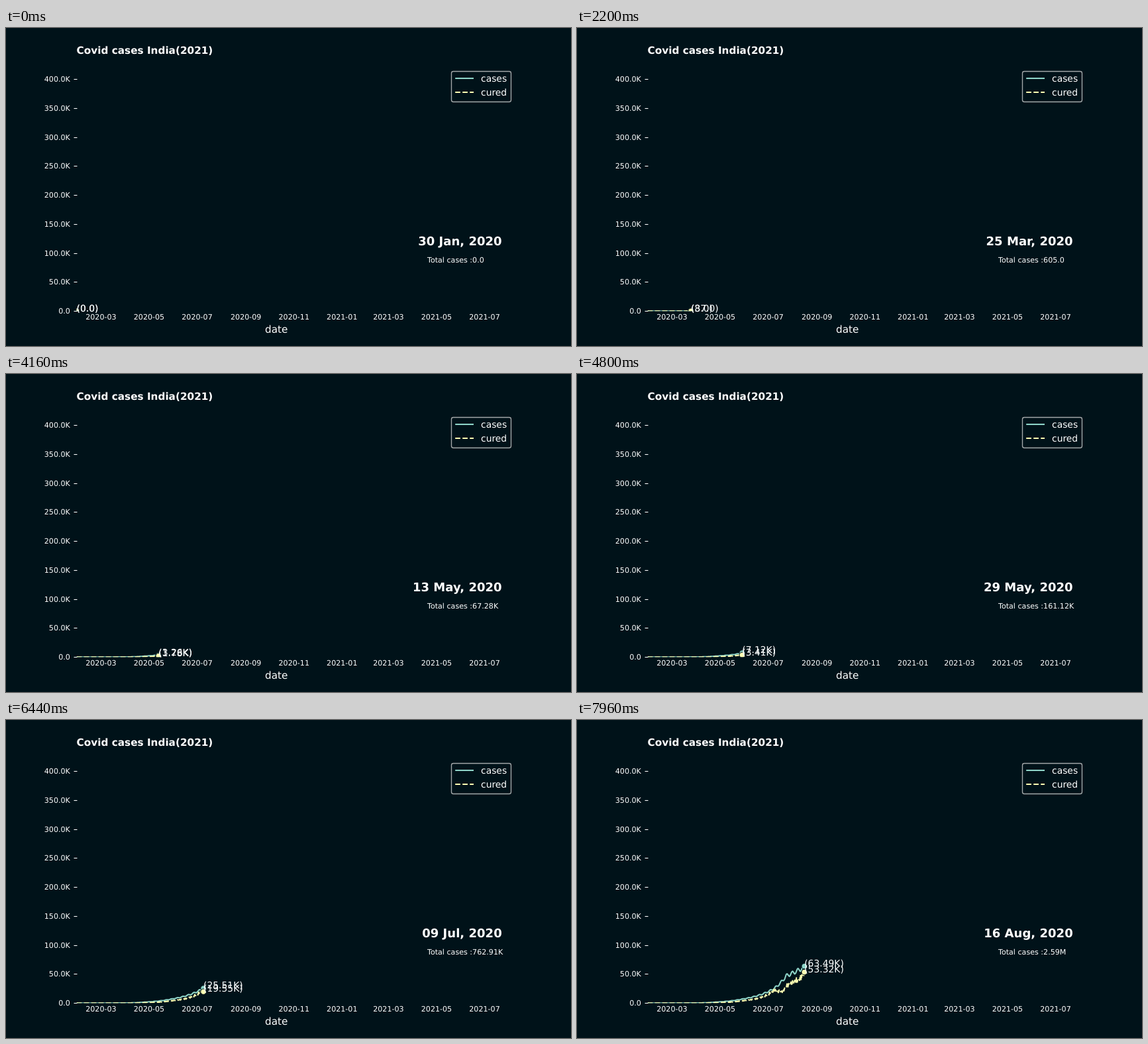
These frames come from a looping animation (853 by 480 pixels, 8 s). An HTML page:

```html
<!DOCTYPE html>
<html lang="en">
<head>
<meta charset="utf-8">
<title>Covid cases India(2021)</title>
<style>
  html, body { margin: 0; width: 100%; height: 100%; overflow: hidden; background: #001219; }
  svg { display: block; width: 853px; height: 480px; }
  text { font-family: "DejaVu Sans", sans-serif; fill: #fff; text-rendering: geometricPrecision; white-space: pre; }
  .small { font-size: 11.11px; }
  .medium { font-size: 13.89px; }
  .large { font-size: 15.28px; }
  .date { font-size: 18.06px; }
  .bold { font-weight: bold; }
  .end { text-anchor: end; }
  .middle { text-anchor: middle; }
  .line { fill: none; stroke-width: 2.08; stroke-linejoin: round; }
  .cases { stroke: #8dd3c7; }
  .cured { stroke: #feffb3; stroke-dasharray: 7.71 3.33; }
  .dot { stroke: #001219; stroke-width: 1; }
</style>
</head>
<body>
<svg viewBox="0 0 853 480">
  <defs><clipPath id="plot"><rect x="106.6" y="57.6" width="661.1" height="369.6"/></clipPath></defs>
  <rect width="853" height="480" fill="#001219"/>
  <text class="large bold" x="106.6" y="39">Covid cases India(2021)</text>
  <text class="large" x="391" y="460">date</text>
  <g id="axes"></g>

  <g clip-path="url(#plot)">
    <path id="casesLine" class="line cases"/>
    <path id="curedLine" class="line cured"/>
    <circle id="casesDot" class="dot" r="4.2" fill="#8dd3c7"/>
    <circle id="curedDot" class="dot" r="4.2" fill="#feffb3"/>
  </g>
  <text id="casesLabel" class="medium"></text>
  <text id="curedLabel" class="medium"></text>

  <rect x="672.5" y="65.5" width="90" height="46" rx="2.8" fill="#001219" stroke="#ccc" stroke-opacity=".8" stroke-width="1.39"/>
  <path class="line cases" d="M678.2 76h27.8"/>
  <path class="line cured" d="M678.2 97h27.8"/>
  <text class="medium" x="717" y="81">cases</text>
  <text class="medium" x="717" y="102">cured</text>

  <text id="date" class="date bold end" x="748.7" y="328"></text>
  <text id="total" class="small" x="636" y="354"></text>
</svg>
<script>
const DAYS = 200, DAY_MS = 40;
const $ = id => document.getElementById(id);
const xAt = day => 106.6 + day * 1.189;
const yAt = count => 427.2 - count * 0.000875;

// Exponential growth through [day, count] keys, times a periodic reporting ripple.
function growth(keys, ripple = () => 1) {
  const level = ([day, count]) => Math.log1p(count / ripple(day));
  return Array.from({ length: DAYS }, (_, day) => {
    const i = Math.max(1, keys.findIndex(key => key[0] >= day));
    const from = keys[i - 1], to = keys[i];
    const part = (day - from[0]) / (to[0] - from[0]);
    const trend = Math.expm1(level(from) + (level(to) - level(from)) * part);
    return Math.round(trend * ripple(day));
  });
}

const wave = (period, peak, size) => day => 1 + size * Math.cos(2 * Math.PI * (day - peak) / period);

const cases = growth([[0, 0], [31, 0], [38, 5], [55, 87], [87, 1710], [120, 7120],
  [161, 25510], [176, 49310], [199, 63490]], wave(7, 1.7, 0.065));
const cured = growth([[0, 0], [38, 0], [55, 3], [87, 704], [120, 3414], [140, 8400],
  [161, 19547], [170, 20500], [177, 33000], [199, 53322]], wave(2.43, 138, 0.12));
const totals = growth([[0, 0], [4, 2], [31, 2], [38, 38], [55, 605], [71, 6700],
  [87, 26600], [120, 161120], [161, 762910], [199, 2589681]]);

function compact(n) {
  const [div, unit] = n >= 1e6 ? [1e6, "M"] : n >= 1e3 ? [1e3, "K"] : [1, ""];
  return (n / div).toFixed(2).replace(/0$/, "") + unit;
}

function buildAxes() {
  let out = "";
  for (let i = 0; i <= 8; i++) {
    const count = i * 50000, y = Math.round(yAt(count));
    const month = new Date(Date.UTC(2020, 2 + 2 * i, 1));
    const day = (month - Date.UTC(2020, 0, 30)) / 864e5;
    out += `<path d="M102.5 ${y + 0.5}h5" stroke="#fff" stroke-width="1.1"/>
      <text class="small end" x="96.9" y="${y + 4}">${compact(count)}</text>
      <text class="small middle" x="${xAt(day)}" y="440.4">${month.toISOString().slice(0, 7)}</text>`;
  }
  $("axes").innerHTML = out;
}

function drawSeries(name, values, day) {
  const x = xAt(day), y = yAt(values[day]);
  const path = values.slice(0, day + 1).map((v, d) => `${xAt(d).toFixed(2)} ${yAt(v).toFixed(2)}`);
  $(name + "Line").setAttribute("d", "M" + path.join("L"));
  $(name + "Dot").setAttribute("cx", x);
  $(name + "Dot").setAttribute("cy", y);
  const label = $(name + "Label");
  label.setAttribute("x", x);
  label.setAttribute("y", y + 0.4);
  label.textContent = `(${compact(values[day])})`;
}

function draw(day) {
  drawSeries("cases", cases, day);
  drawSeries("cured", cured, day);
  const date = new Date(Date.UTC(2020, 0, 30 + day));
  const month = "Jan Feb Mar Apr May Jun Jul Aug".split(" ")[date.getUTCMonth()];
  $("date").textContent = `${String(date.getUTCDate()).padStart(2, "0")} ${month}, 2020`;
  $("total").textContent = "Total cases :" + compact(totals[day]);
}

const start = performance.now();
let shown = -1;
function tick() {
  const day = Math.floor((performance.now() - start) / DAY_MS) % DAYS;
  if (day !== shown) draw(shown = day);
  requestAnimationFrame(tick);
}
buildAxes();
tick();
</script>
</body>
</html>
```
